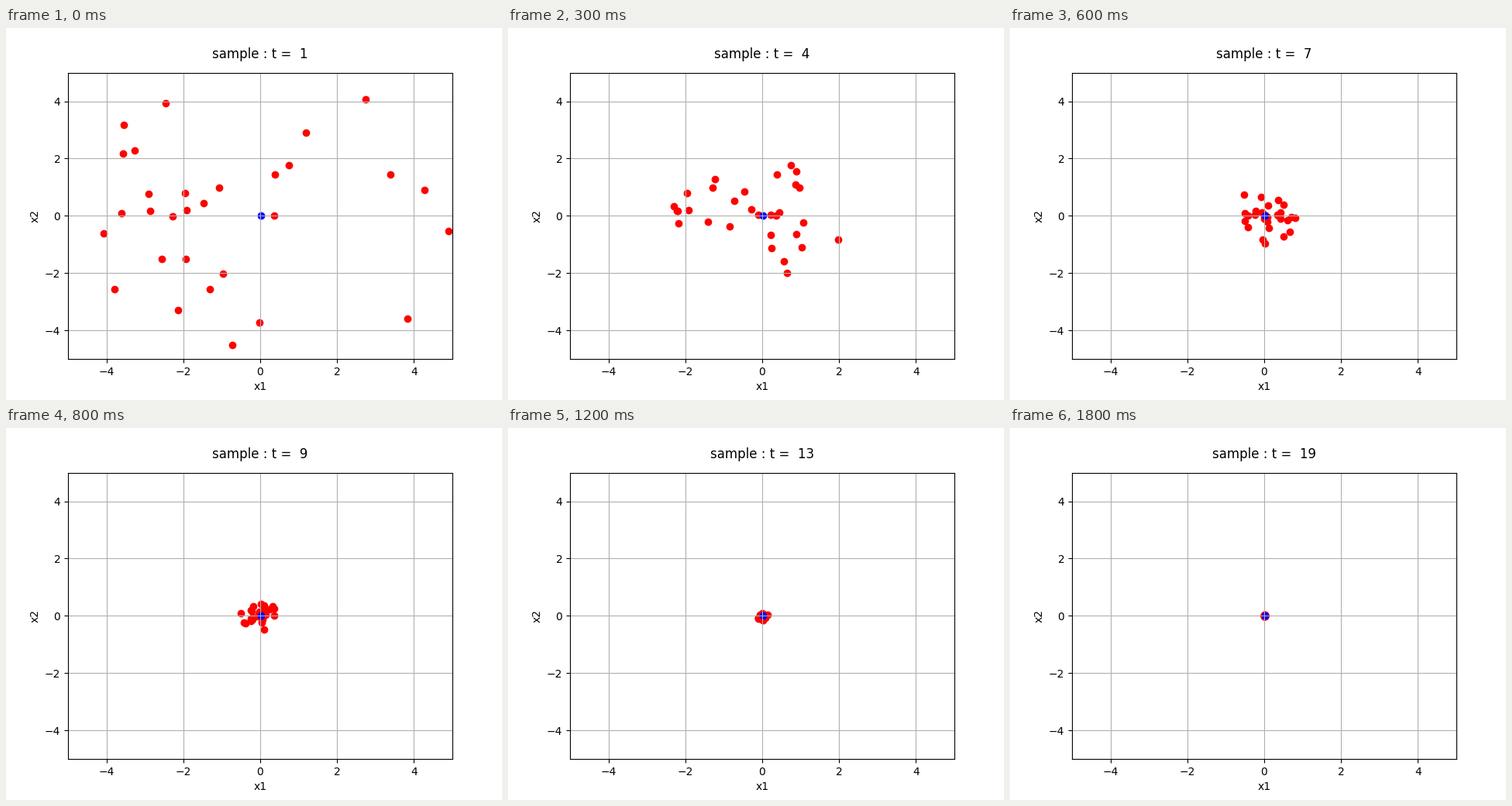
These frames come from a looping animation (640x480 px, 1900 ms). A matplotlib script:

```python
import numpy as np
import matplotlib.pyplot as plt
from matplotlib.animation import FuncAnimation

COUNT = 30
STEPS = 19
OPTIMUM = np.array([0.01, 0.0])
rng = np.random.default_rng(11)

# Good starts keep their place until the search radius passes them.
SETTLED = [(0.37, 0), (0.39, 1.44), (0.75, 1.76), (-1.95, 0.8)]
# Outlying starts that give the first swarm its outline.
OUTER = [(-0.72, -4.51), (3.84, -3.59), (4.89, -0.54), (4.28, 0.9),
         (3.39, 1.44), (2.75, 4.07), (1.19, 2.9), (-2.46, 3.93),
         (-4.07, -0.61), (-0.02, -3.73)]


def reach(t):
    """Search radius around the optimum at generation t."""
    return 8 * np.exp(-0.3 * t)


def first_swarm():
    known = np.array(SETTLED + OUTER)
    rest = rng.uniform((-4, -3.5), (-0.9, 3.7), (COUNT - len(known), 2))
    return np.vstack([known, rest])


def next_swarm(swarm, t):
    """Redraw particles outside the reach, and some of the others."""
    far = np.hypot(*(swarm - OPTIMUM).T) > reach(t)
    restless = rng.random(COUNT) < 0.6
    restless[:len(SETTLED)] = False
    radius = reach(t) * rng.random(COUNT)
    angle = rng.uniform(0, 2 * np.pi, COUNT)
    trial = OPTIMUM + np.column_stack([radius * np.cos(angle),
                                       radius * np.sin(angle)])
    return np.where((far | restless)[:, None], trial, swarm)


swarms = [first_swarm()]
for t in range(2, STEPS + 1):
    swarms.append(next_swarm(swarms[-1], t))

fig, ax = plt.subplots(figsize=(6.4, 4.8), dpi=100)
ax.set(xlim=(-5, 5), ylim=(-5, 5), xlabel="x1", ylabel="x2")
ax.set_xticks(range(-4, 5, 2))
ax.set_yticks(range(-4, 5, 2))
ax.grid(True)
dots = ax.scatter(*swarms[0].T, c="red")
best = ax.scatter([0.02], [0], c="blue")
title = ax.text(0.5, 1.05, "", transform=ax.transAxes, ha="center",
                va="baseline", fontsize="large")


def update(i):
    dots.set_offsets(swarms[i])
    title.set_text(f"sample : t =  {i + 1}")
    return dots, title


anim = FuncAnimation(fig, update, frames=STEPS, interval=100,
                     repeat=True, repeat_delay=0)
plt.show()
```
